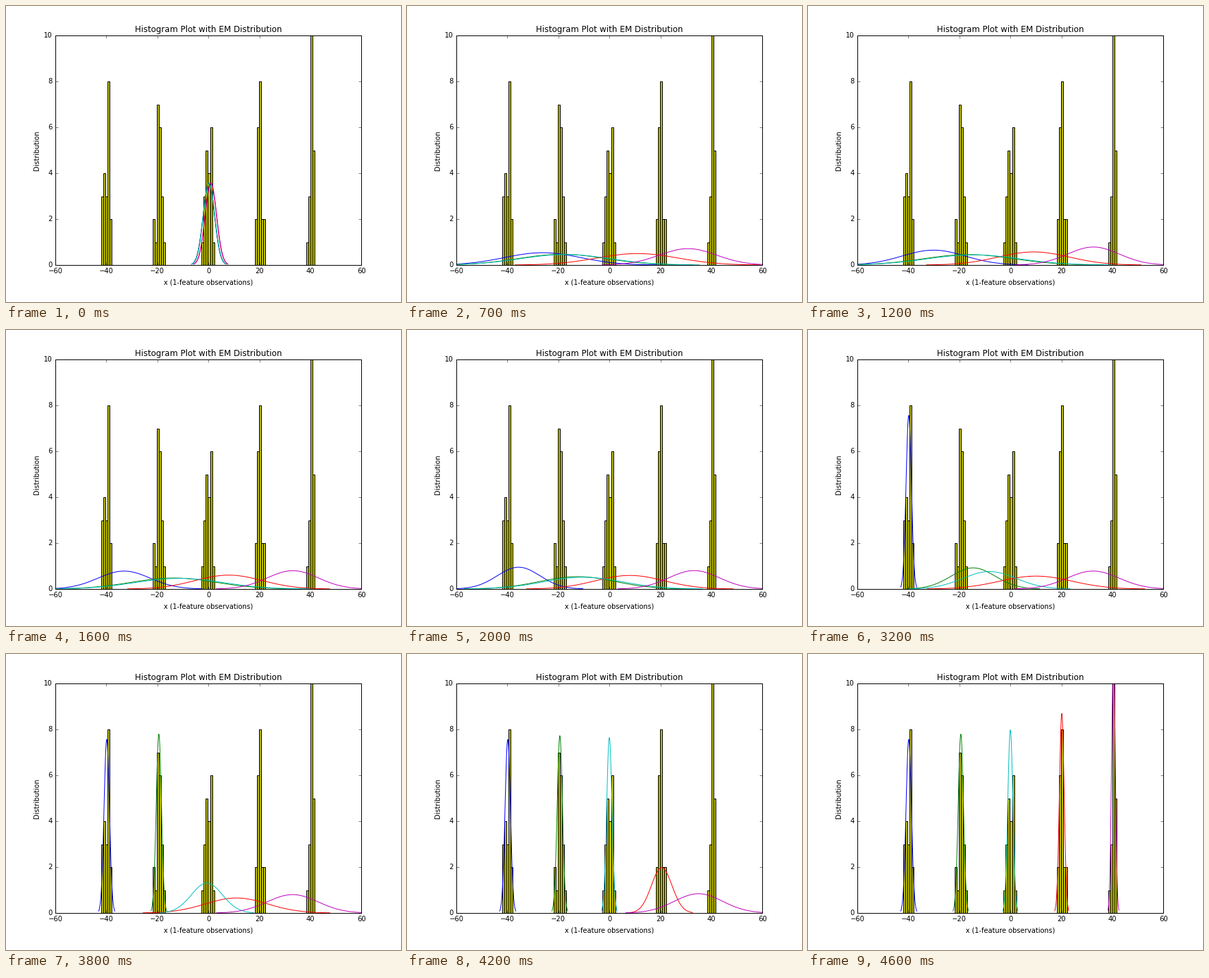
Recreate the animation shown at these times as a matplotlib script. Size 576x432 px, loop 5700 ms.

```python
import numpy as np
import matplotlib.pyplot as plt
from matplotlib.animation import FuncAnimation

plt.style.use("classic")
plt.rcParams.update({
    "font.family": "DejaVu Sans",
    "font.size": 10,
    "figure.facecolor": "white",
    "savefig.facecolor": "white",
    "savefig.dpi": "figure",
})

STEP_MS = 100
FRAMES = 57
COLORS = "bgcrm"        # components from left to right
DRAW_ORDER = "bgrcm"

# Histogram: first bin of each cluster and its counts
LEFT, WIDTH = -42.04, 0.8367
CLUSTERS = {
    0: [3, 4, 3, 8, 2],
    24: [2, 1, 7, 6, 3, 1],
    47: [1, 3, 5, 4, 6, 1],
    72: [2, 6, 8, 2, 2],
    96: [1, 3, 11, 5],
}
bins = np.concatenate([start + np.arange(len(c)) for start, c in CLUSTERS.items()])
counts = np.concatenate(list(CLUSTERS.values()))
edges = LEFT + WIDTH * bins
data = np.repeat(edges + WIDTH / 2, counts)

# Where every component ends: on its own cluster of 20 observations
centers = data.reshape(5, 20).mean(axis=1)
settled = list(zip(centers, [1.054, 1.023, 1, 0.917, 0.72]))

# Iteration -> (mean, deviation) of the components that have not settled yet
KEYS = {
    0: [(m, 5 ** 0.5) for m in (0.15, 0.2, 0.25, 0.9, 1)],
    7: [(-26.2, 14.9), (-18.5, 17.1), (-17.3, 17.5), (11, 16), (30.8, 11.2)],
    20: [(-35.6, 8.4), (-12.5, 14.8), (-10.3, 15.6), (8, 13.5), (33.2, 9.95)],
    32: [(-14.6, 8.67), (-8.2, 10.5), (10, 14.2), (32.4, 10.2)],
    38: [(-0.6, 6.1), (11, 12.2), (33, 9.95)],
    46: [],
}


def key_state(k):
    moving = KEYS[k]
    return np.array(settled[:5 - len(moving)] + moving, float).T


def expect(mu, sd, w):
    """Share of each observation that belongs to each component."""
    z = (data[:, None] - mu) / sd
    logp = np.log(w) - np.log(sd) - z ** 2 / 2
    p = np.exp(logp - logp.max(axis=1, keepdims=True))
    return p / p.sum(axis=1, keepdims=True)


def em_step(mu, sd, w):
    r = expect(mu, sd, w)
    n = r.sum(axis=0) + 1e-9
    mu = (r * data[:, None]).sum(axis=0) / n
    var = (r * (data[:, None] - mu) ** 2).sum(axis=0) / n
    return mu, np.sqrt(np.maximum(var, 0.4)), n / n.sum()


def fit_path():
    """EM iterations, steered smoothly through the key states."""
    path = []
    w = np.full(5, 0.2)
    times = sorted(KEYS)
    for a, b in zip(times, times[1:]):
        mu, sd = key_state(a)
        run = []
        for _ in range(b - a):
            run.append((mu, sd))
            mu, sd, w = em_step(mu, sd, w)
        end_mu, end_sd = key_state(b)
        for i, (m, s) in enumerate(run):
            u = i / (b - a)
            path.append((m + u * (end_mu - mu), s * (end_sd / sd) ** u))
    path.append((end_mu, end_sd))
    return path


path = fit_path()

fig = plt.figure(figsize=(8, 6), dpi=72)
ax = fig.add_axes([0.125, 0.125, 0.775, 0.775])
ax.bar(edges, counts, WIDTH, align="edge", color="y", edgecolor="k", linewidth=1)
curves = [ax.plot([], [], color=c, linewidth=1, zorder=2 + DRAW_ORDER.index(c) / 10)[0]
          for c in COLORS]
ax.set_xlim(-60, 60)
ax.set_ylim(0, 10)
ax.set_xticks(range(-60, 61, 20))
ax.set_yticks(range(0, 11, 2))
ax.set_title("Histogram Plot with EM Distribution")
ax.set_xlabel("x (1-feature observations)", labelpad=6)
ax.set_ylabel("Distribution")

z = np.linspace(-3, 3, 100)
bell = 20 * np.exp(-z ** 2 / 2) / np.sqrt(2 * np.pi)


def update(i):
    for curve, mu, sd in zip(curves, *path[min(i, len(path) - 1)]):
        curve.set_data(mu + sd * z, bell / sd)
    return curves


anim = FuncAnimation(fig, update, frames=FRAMES, interval=STEP_MS,
                     init_func=lambda: update(0), repeat=True, repeat_delay=0)
plt.show()
```
